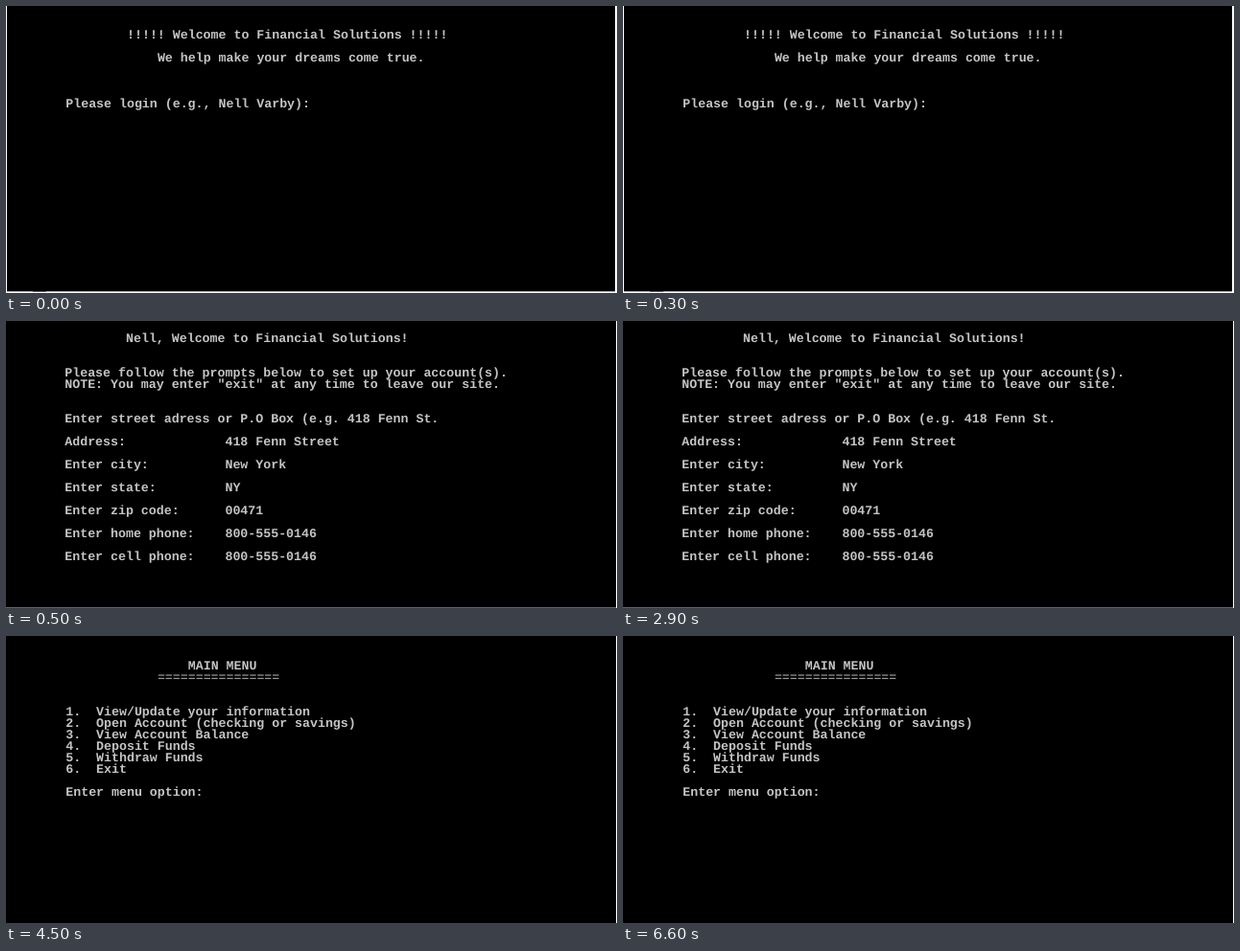
Write an HTML page that moves like this. It is 637 px wide and 300 px high and loops after 8000 ms.

```html
<!DOCTYPE html>
<html lang="en">
<head>
<meta charset="utf-8">
<title>Console banking demo</title>
<style>
  html, body { margin: 0; width: 100%; height: 100%; overflow: hidden; background: #fff; }
  svg { display: block; width: 637px; height: 300px; }
  text {
    font: bold 13.28px "Liberation Mono", monospace;
    fill: #c4c4c4;
    white-space: pre;
    text-rendering: geometricPrecision;
  }
  .rule { font-weight: normal; }
</style>
</head>
<body>
<svg id="stage" viewBox="0 0 637 300"></svg>
<script>
const LOOP = 8000, CELL = 7.97, ROW = 12;
const stage = document.getElementById("stage");

// Each line is [row, column, text, class] on the console's character grid.
const screens = [
  {
    start: 0, x: -1.5, y: 10, window: [1, 0, 634, 298], edge: "#aaa5b0",
    lines: [
      [2, 16, "!!!!! Welcome to Financial Solutions !!!!!"],
      [4, 20, "We help make your dreams come true."],
      [8, 8, "Please login (e.g., Nell Varby):"]
    ]
  },
  {
    start: 500, x: -2.5, y: 10, window: [0, 0, 636, 299], edge: "#5c6070",
    lines: [
      [1, 16, "Nell, Welcome to Financial Solutions!"],
      [4, 8, "Please follow the prompts below to set up your account(s)."],
      [5, 8, 'NOTE: You may enter "exit" at any time to leave our site.'],
      [8, 8, "Enter street adress or P.O Box (e.g. 418 Fenn St."],
      ...[
        ["Address:", "418 Fenn Street"],
        ["Enter city:", "New York"],
        ["Enter state:", "NY"],
        ["Enter zip code:", "00471"],
        ["Enter home phone:", "800-555-0146"],
        ["Enter cell phone:", "800-555-0146"]
      ].map(([label, value], i) => [10 + 2 * i, 8, label.padEnd(21) + value])
    ]
  },
  {
    start: 4500, x: -1.5, y: 11, window: [0, 0, 636, 300], edge: "none",
    lines: [
      [2, 24, "MAIN MENU"],
      [3, 20, "=".repeat(16), "rule"],
      ...[
        "View/Update your information",
        "Open Account (checking or savings)",
        "View Account Balance",
        "Deposit Funds",
        "Withdraw Funds",
        "Exit"
      ].map((item, i) => [6 + i, 8, `${i + 1}.  ${item}`]),
      [13, 8, "Enter menu option:"]
    ]
  }
];

function add(parent, tag, attributes, content = "") {
  const node = document.createElementNS("http://www.w3.org/2000/svg", tag);
  for (const name in attributes) node.setAttribute(name, attributes[name]);
  node.textContent = content;
  return parent.appendChild(node);
}

for (const screen of screens) {
  const [x, y, width, height] = screen.window;
  screen.group = add(stage, "g", {});
  add(screen.group, "rect", { x, y, width, height });
  add(screen.group, "rect", { x, y: height, width, height: 1, fill: screen.edge });
  for (const [row, column, content, style = ""] of screen.lines) {
    add(screen.group, "text", {
      x: screen.x + column * CELL,
      y: screen.y + row * ROW,
      class: style
    }, content);
  }
}
// Shadow below the login screen.
add(screens[0].group, "rect", { x: 28, y: 298, width: 14, height: 1, fill: "#555" });

function draw() {
  const time = performance.now() % LOOP;
  const current = screens.findLast(screen => time >= screen.start);
  for (const screen of screens) {
    screen.group.style.display = screen === current ? "" : "none";
  }
  requestAnimationFrame(draw);
}
draw();
</script>
</body>
</html>
```
